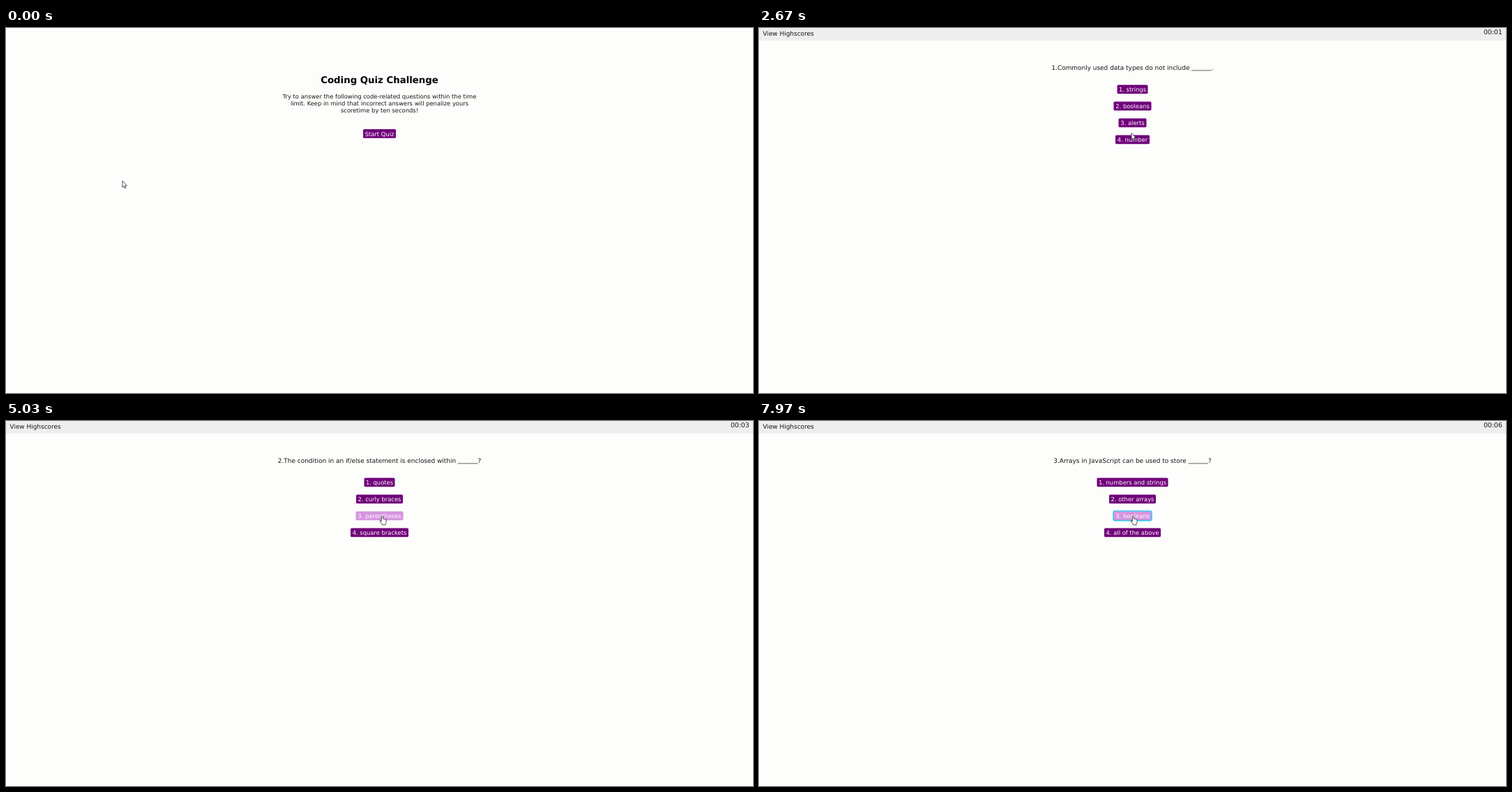
An HTML page with a canvas for the animation above (8 s loop, 1071 by 523 pixels).

```html
<!DOCTYPE html>
<html lang="en">
<head>
<meta charset="utf-8">
<title>Coding Quiz Challenge</title>
<style>
  html, body { margin: 0; width: 100%; height: 100%; overflow: hidden; background: #fdfdfc; }
  canvas { display: block; }
</style>
</head>
<body>
<canvas id="stage" width="1071" height="523"></canvas>
<script>
const ctx = document.getElementById('stage').getContext('2d');
const W = 1071, H = 523, MID = 535.5, LOOP = 8000;
const INK = '#161616', PURPLE = '#70007a', HOVER = '#d694de';

// Moments in ms
const START = 2400, PRESS = 7900;
const QUESTIONS = [
  { from: START, text: '1.Commonly used data types do not include ', end: '.',
    answers: ['1. strings', '2. booleans', '3. alerts', '4. number'] },
  { from: 4110, text: '2.The condition in an if/else statement is enclosed within ', end: '?',
    answers: ['1. quotes', '2. curly braces', '3. parentheses', '4. square brackets'] },
  { from: 6010, text: '3.Arrays in JavaScript can be used to store ', end: '?',
    answers: ['1. numbers and strings', '2. other arrays', '3. booleans', '4. all of the above'] }
];
const FEEDBACK = [[3610, 4110], [5510, 6010]];

// Pointer stops: time, x, y
const POINTER = [
  [0, 167, 219], [120, 167, 219], [820, 532.5, 155], [2430, 532.5, 155],
  [2600, 534, 150.5], [2720, 534, 150.5], [3050, 539.5, 136],
  [6900, 539.5, 136], [7250, 536.5, 136], [LOOP, 536.5, 136]
];

function pointerAt(t) {
  const i = POINTER.findIndex(p => p[0] > t);
  const [t0, x0, y0] = POINTER[i - 1], [t1, x1, y1] = POINTER[i];
  const k = (t - t0) / (t1 - t0), e = k * k * (3 - 2 * k);
  return { x: x0 + (x1 - x0) * e, y: y0 + (y1 - y0) * e };
}

function setFont(size, weight = 'normal') {
  ctx.font = `${weight} ${size}px "DejaVu Sans", Verdana, sans-serif`;
}

function label(text, x, y, size, { align = 'center', color = INK, weight } = {}) {
  setFont(size, weight);
  ctx.textAlign = align;
  ctx.fillStyle = color;
  ctx.fillText(text, x, y);
}

function roundBox(x, y, w, h, r) {
  ctx.beginPath();
  ctx.roundRect(x, y, w, h, r);
}

// Draws a centred button and tells whether the pointer is on it
function button(text, top, pointer, focused) {
  setFont(8.4);
  const w = Math.round(ctx.measureText(text).width + 5.2), h = 12.8;
  const x = MID - w / 2;
  const over = pointer.x >= x && pointer.x <= x + w && pointer.y >= top && pointer.y <= top + h;
  roundBox(x, top, w, h, 1.6);
  ctx.fillStyle = over ? HOVER : PURPLE;
  ctx.fill();
  if (focused) {
    roundBox(x - 0.4, top - 0.4, w + 0.8, h + 0.8, 2);
    ctx.strokeStyle = '#38c0f4';
    ctx.lineWidth = 1.6;
    ctx.stroke();
  }
  label(text, MID, top + 9.6, 8.4, { color: '#fff' });
  return over;
}

function intro(pointer) {
  label('Coding Quiz Challenge', MID, 78.5, 13.3, { weight: 'bold', color: '#000' });
  ['Try to answer the following code-related questions within the time',
   'limit. Keep in mind that incorrect answers will penalize yours',
   'scoretime by ten seconds!'
  ].forEach((line, i) => label(line, MID, 101 + i * 10, 8.38));
  return button('Start Quiz', 145, pointer);
}

function questionLine({ text, end }) {
  const blank = '______', size = 8.95, blankSize = 9.5;
  setFont(blankSize);
  const gap = ctx.measureText(blank).width;
  setFont(size);
  const lead = ctx.measureText(text).width;
  const x = MID - (lead + gap + ctx.measureText(end).width) / 2;
  label(text, x, 60, size, { align: 'left' });
  label(blank, x + lead, 59.3, blankSize, { align: 'left' });
  label(end, x + lead + gap, 60, size, { align: 'left' });
}

function quiz(t, pointer) {
  ctx.fillStyle = '#eeeeee';
  ctx.fillRect(0, 0, W, 18);
  label('View Highscores', 5.5, 11, 8.93, { align: 'left' });
  const seconds = 1 + Math.floor((t - START) / 1000);
  label('00:' + String(seconds).padStart(2, '0'), 1065.7, 9, 9.3, { align: 'right' });

  const q = QUESTIONS.filter(item => t >= item.from).pop();
  questionLine(q);
  let over = false;
  q.answers.forEach((answer, i) => {
    const focused = i === 2 && t >= PRESS;
    over = button(answer, 81.4 + i * 24, pointer, focused) || over;
  });

  if (FEEDBACK.some(([from, to]) => t >= from && t < to)) {
    ctx.fillStyle = '#a5a598';
    ctx.fillRect(321, 177, 429, 1);
    label('Correct!', MID, 195, 8.93, { color: '#808080' });
  }
  return over;
}

const ARROW = new Path2D('M0 0V9.3L2.1 7.4L3.5 10.6L4.9 10L3.5 6.9H6.3Z');
const HAND = new Path2D(
  'M-1.1 .9Q0 -.7 1.1 .9V4.3Q2 3.6 2.7 4.6Q3.6 4 4.2 5Q5.4 4.6 5.6 6' +
  'V8.6Q5.5 10.4 4.6 11.4V12.8H-.4V11.6L-3.1 8.1Q-3.8 6.6 -2.5 6.5L-1.1 7.8Z');

function drawPointer({ x, y }, isHand) {
  const shape = isHand ? HAND : ARROW;
  ctx.save();
  ctx.translate(x, y);
  ctx.fillStyle = '#fff';
  ctx.strokeStyle = '#26262e';
  ctx.lineWidth = 0.8;
  ctx.lineJoin = 'round';
  ctx.fill(shape);
  ctx.stroke(shape);
  ctx.restore();
}

function frame() {
  const t = performance.now() % LOOP;
  const pointer = pointerAt(t);
  ctx.textRendering = 'geometricPrecision';
  ctx.fillStyle = '#fdfdfc';
  ctx.fillRect(0, 0, W, H);
  const over = t < START ? intro(pointer) : quiz(t, pointer);
  drawPointer(pointer, over);
  requestAnimationFrame(frame);
}
frame();
</script>
</body>
</html>
```
